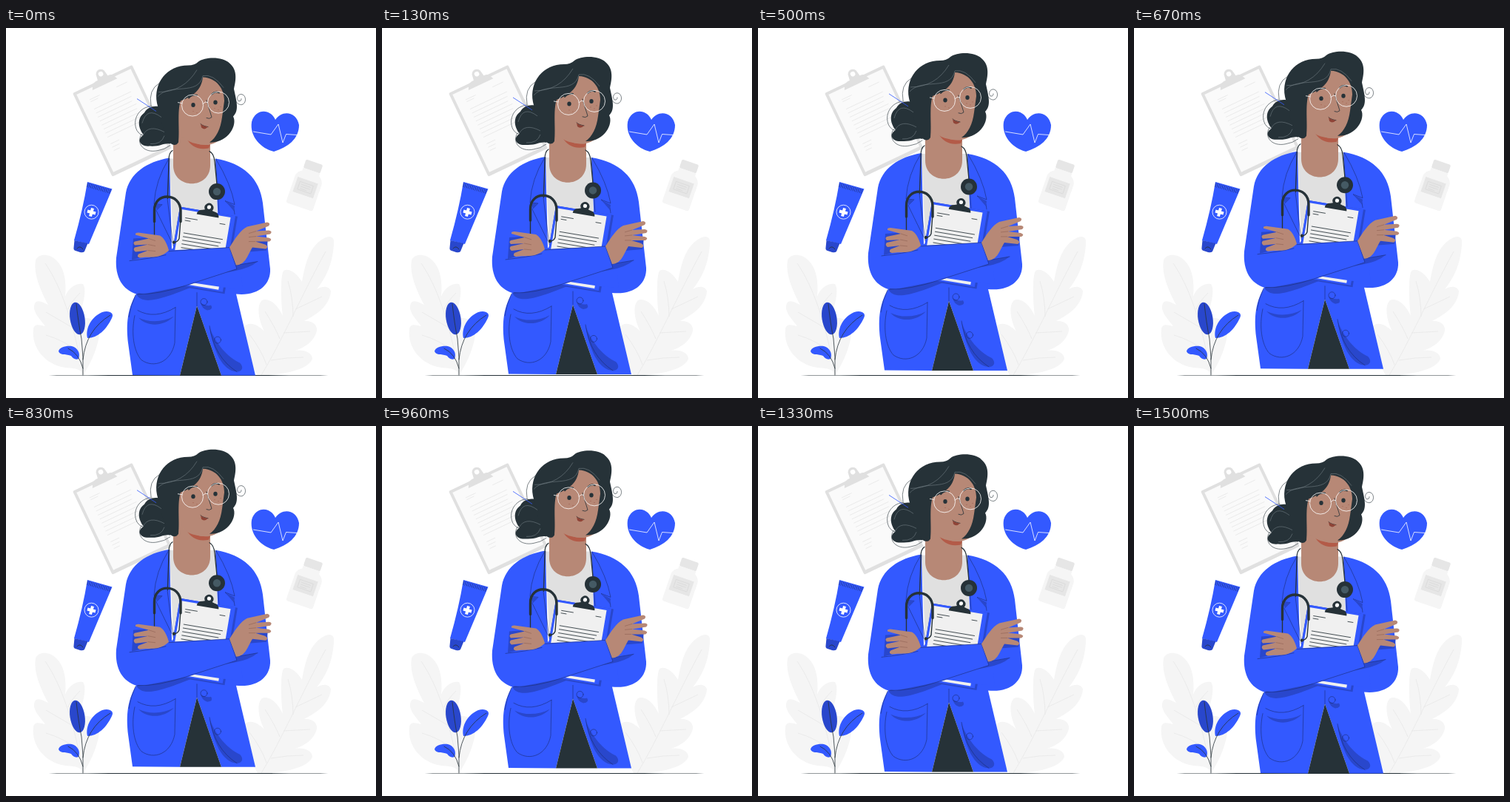
These frames come from a looping animation (500 by 500 pixels, 1540 ms). An HTML page:

```html
<!DOCTYPE html>
<html lang="en">
<head>
<meta charset="utf-8">
<title>Doctor</title>
<style>
  html, body { margin: 0; height: 100%; overflow: hidden; background: #fff; }
  svg { display: block; width: 100vw; height: 100vh; }
  .blue { fill: #3359ff; }
  .deep { fill: #2947cc; }
  .dark { fill: #263238; }
  .skin { fill: #b78876; }
  .pale { fill: #f5f5f5; }
  .mist { fill: #fafafa; }
  .grey { fill: #e0e0e0; }
  .soft { fill: #e6e6e6; }
  .line { fill: none; stroke: #263238; stroke-width: .8; stroke-linecap: round; stroke-linejoin: round; }
  .seam { fill: none; stroke: #1c2c73; stroke-width: .6; stroke-linecap: round; stroke-linejoin: round; }
  .vein { fill: none; stroke: #e6e6e6; stroke-width: .7; }
  .white { fill: none; stroke: #fff; stroke-width: .8; }
  .hair { fill: none; stroke: #7f8b91; stroke-width: .5; }
</style>
</head>
<body>
<svg viewBox="0 0 500 500">
  <!-- background foliage -->
  <path class="pale" d="M104 468C100 459 90 460 80 459C54 455 34 433 37 407C38 399 45 401 53 403C43 390 35 382 39 372C42 366 51 371 57 374C45 352 37 330 40 314C44 304 59 305 68 314C78 323 82 340 80 363C84 351 95 344 104 346C110 354 104 377 96 396C103 389 117 390 126 402C128 420 120 444 105 468Z"/>
  <path class="vein" d="M53 318C75 350 92 400 104 468M54 384L90 405M54 415Q78 422 97 437M100 358Q88 370 84 380"/>
  <path class="pale" d="M340 469C325 445 318 420 322 404C328 395 342 402 349 410C340 392 339 374 346 368C356 364 367 374 374 389C371 362 371 336 375 328C383 323 394 333 400 343C405 315 411 293 432 283C441 280 444 284 443 293C441 320 432 338 420 353C430 347 438 350 439 356C437 376 420 387 403 396C414 395 421 401 420 409C416 425 402 433 387 437C400 433 414 438 414 447C409 462 372 470 340 469Z"/>
  <path class="vein" d="M345 469C372 425 400 360 432 302M381 342Q388 365 388 390M350 383Q364 405 370 420M329 414Q345 435 352 455M427 363L391 380M411 410L375 412M402 445Q380 445 358 449"/>

  <!-- background clipboard -->
  <g transform="translate(90 88) rotate(-25.4)">
    <rect class="grey" width="89" height="125" rx="2"/>
    <rect class="mist" x="4" y="4" width="81" height="116"/>
    <path class="grey" d="M26 8L29 2Q31 -1 38 -1L39 -7A6.5 6.5 0 0 1 52 -7L53 -1Q59 -1 60 2L63 8Z"/>
    <circle cx="45.500" cy="-7" r="3.300" fill="#fff"/>
    <g id="notes" class="vein"></g>
  </g>

  <!-- tube -->
  <path class="blue" d="M110 208L143.500 217.500L112 292L92 287Q104 245 110 208Z"/>
  <path class="deep" d="M92.500 287L110.500 291L106 302Q104 304 100 303L94 301Q91 300 91.500 297Z"/>
  <path class="line" d="M96 298Q100 293 104 299"/>
  <path d="M110 212L141 221" fill="none" stroke="#1c2c73" stroke-width="6" stroke-dasharray=".6 1.800"/>
  <circle class="white" cx="115.500" cy="248.700" r="9.500"/>
  <path d="M117 243.500L114 254.500M110 247.500L121 250.500" stroke="#fff" stroke-width="4"/>

  <!-- heart -->
  <path class="blue" d="M364 124C358 109 337 108 332 127C329 147 345 163 362 167C381 161 396 150 396 131C393 113 373 110 364 124Z"/>
  <path class="white" d="M334 140L358 144L368 130L374 155L378.500 143.500L393 144.500"/>

  <!-- bottle -->
  <g transform="translate(415 187) rotate(19)">
    <rect class="soft" x="-12" y="-6" width="24" height="12" rx="2"/>
    <path class="pale" d="M-12 6H12V10Q19 14 19 21V55Q19 58 16 58H-16Q-19 58 -19 55V21Q-19 14 -12 10Z"/>
    <rect class="soft" x="-15" y="20" width="29" height="21"/>
    <path d="M-10 25H9V36H-10ZM-7 28H6M-7 31H6M-7 34H2" fill="none" stroke="#d8d8d8" stroke-width=".7"/>
  </g>

  <!-- plant -->
  <ellipse class="deep" cx="96.500" cy="392.500" rx="10" ry="22" transform="rotate(-9 96.500 392.500)"/>
  <path class="blue" d="M110 419C107 405 116 390 130 384C139 381 147 385 143 392C136 407 124 419 110 419Z"/>
  <path class="blue" d="M71 437C72 431 82 429 89 430C97 432 101 440 98 447C94 449 90 446 88 443C82 440 73 443 71 437Z"/>
  <path class="line" d="M95 373Q98 400 102 420Q105 445 104 469M141 388Q108 408 104 448M84 433Q99 440 104 460"/>
  <ellipse class="dark" cx="246.500" cy="469.500" rx="192.500" ry=".5"/>

  <g id="doctor">
    <!-- torso -->
    <path class="grey" d="M221 176L285 176L290 262L226 292Z"/>
    <path class="skin" d="M226 145L276 150V185C276 218 226 218 226 185Z"/>
    <path class="blue" d="M221 175C190 180 167 196 162 222L149 310C147 337 158 353 176 359C162 382 163 405 165 425L171 468.500L235 469L258 375L291 469L337 469L311 359C340 362 358 347 357 325L347 236C343 203 321 182 283 176L288 290L224 298Z"/>
    <path class="dark" d="M258 375L235 469H291Z"/>
    <path class="seam" d="M221 176L218 230L226 294M220 176Q202 205 200 237L211 238L203 246L224 289M283 177L288 250M284 177Q304 210 309 238L296 233L308 244L309 251"/>
    <path class="deep" d="M201 238L211 238L204 245ZM296 233L309 240L308 247Z"/>

    <!-- coat details -->
    <path class="deep" d="M176 359C184 374 207 368 257 347L220 345ZM179 391C190 403 212 404 227 389C212 397 194 398 179 391ZM263 371Q271 376 277 374Q281 380 272 381Q265 379 263 371ZM275 403C282 425 300 445 316 452C322 458 319 464 312 464C292 463 280 435 275 403Z"/>
    <path class="seam" d="M174 388C169 410 172 436 183 448C200 460 223 451 228 425L229 377M178 381Q201 394 229 377M258 357V375M275 402Q281 444 312 464M175 360Q168 375 166 390"/>
    <circle class="seam" cx="267.500" cy="369.500" r="4.500"/>
    <circle class="seam" cx="286" cy="421" r="4.500"/>

    <!-- front clipboard -->
    <g transform="translate(235 241) rotate(9.500)">
      <path class="deep" d="M0 0H79V106H0Z"/>
      <path class="blue" d="M0 0H76V104H0Z"/>
      <path fill="#f0f0f0" d="M3 3H70V102H3Z"/>
      <path class="dark" d="M24 6Q24 0 31 -1L34 -2A6 6 0 1 1 44 -2L47 -1Q54 0 54 6Z"/>
      <circle cx="39" cy="-6" r="2.600" fill="#fff"/>
      <g id="chart" class="line"></g>
    </g>

    <!-- stethoscope -->
    <path class="line" style="stroke-width:1.200" d="M225 165Q220 168 220 178L218.500 230M275 166Q281 169 282 180L285 211"/>
    <path class="line" style="stroke-width:1.400" d="M200.500 259V290M236 258L234 284Q232 289 227 289"/>
    <path class="line" style="stroke-width:3.400" d="M200.500 261V246C200 221 236 221 236 247V261"/>
    <circle class="dark" cx="227" cy="289" r="2.200"/>
    <circle class="dark" cx="285" cy="220.500" r="11"/>
    <circle cx="285" cy="220.500" r="5.200" fill="#455a64"/>

    <!-- arms -->
    <path class="blue" d="M316 318L254 344L294 350L320 352Z"/>
    <path class="deep" d="M297 330L312 320L340 315Q330 324 308 328ZM172 284L200 282V311L170 313ZM330 288L354 285L352 300L328 302Z"/>
    <path class="blue" d="M150 320L166 314L221 300L302 296L312 325L246 347L186 359Q155 357 150 320Z"/>
    <path class="seam" d="M167 314Q195 311 216 306M220 301L302 296L312 325L244 347Q205 360 178 359M311 320L340 315"/>
    <path class="skin" d="M220 300C217 289 213 283 208 280L179 276Q174 276 175 279L193 284L174 288Q171 290 174 293L192 292L174 296Q171 299 175 302L192 300L179 305Q176 309 181 310C195 308 208 312 220 300Z"/>
    <path class="skin" d="M302 296C309 285 317 272 326 268L353 262Q358 263 355 267L338 274L355 273Q361 274 357 278L338 281L355 283Q361 285 356 288L337 288L350 292Q356 295 351 298L333 296C326 307 324 319 311 320Z"/>
    <path fill="none" stroke="#8f6254" stroke-width=".6" d="M193 284L202 287M192 292L202 294M192 300L202 301M338 274L328 277M338 281L328 282M337 288L328 288"/>

    <!-- head -->
    <path class="dark" d="M222 156C213 154 209 160 194 159C181 160 176 150 186 144C178 134 177 121 187 114C191 106 202 103 210 107L233 115L226 150Z"/>
    <path fill="#b35b48" d="M244 149C253 155 264 159 276 157L274 162C259 165 250 159 244 149Z"/>
    <path class="skin" d="M232 98L266 64L288 64L299 88C299 113 297 138 289 150C280 159 268 158 258 156Q246 154 240 147L233 148Z"/>
    <path class="dark" d="M204 101C199 73 218 50 246 50Q255 50 260 45C270 38 293 38 302 47C314 57 310 72 308 82C312 100 315 111 307 119C313 130 301 155 275 154C284 148 290 136 292 120L295 98C295 82 285 67 266 66C264 84 252 92 236 98C231 112 235 137 233 154C229 161 220 157 217 146C210 131 208 116 204 101Z"/>
    <path class="hair" d="M205 92C222 73 260 92 266 64Q280 61 294 80M206 86Q240 86 258 56M210 120Q190 105 184 128M214 140Q193 129 185 144M195 156Q210 157 214 145"/>
    <path class="line" style="stroke-width:.6" d="M207 74Q192 83 196 104M197 105C179 106 170 124 177 138Q182 146 188 144M183 143C175 156 187 169 205 165Q214 164 222 158M307 80C306 97 313 104 319 103C325 101 325 91 319 89C313 88 311 95 314 98Q318 99 318 95"/>
    <path d="M177 95L203 112" stroke="#3359ff" stroke-width=".8"/>

    <!-- face -->
    <g class="dark">
      <ellipse cx="253" cy="103.500" rx="2.700" ry="3"/>
      <ellipse cx="283" cy="100" rx="2.700" ry="3"/>
    </g>
    <path class="line" style="stroke-width:1.800" d="M247 94Q251 89 258 90M278 89Q283 84 288 87"/>
    <path class="line" d="M271 97L278 120Q275 123 271 121M263 129Q266 132 273 133"/>
    <path fill="#8f4437" d="M263 129Q266 132 273 133Q268 138 264 134Z"/>
    <path fill="none" stroke="#a0604f" stroke-width="1.200" stroke-linecap="round" d="M253 112h0M258 114h0M282 108h0M287 110h0M290 106h0"/>
    <g class="white">
      <circle cx="252" cy="104" r="14.500"/>
      <circle cx="287" cy="100" r="14.500"/>
      <path d="M266 102Q269 98 273 100M238 101L232 100"/>
    </g>
  </g>
</svg>
<script>
  const byId = id => document.getElementById(id);
  const addLines = (id, rows) => {
    const d = rows.map(([x1, x2, y]) => `M${x1} ${y}H${x2}`).join('');
    byId(id).innerHTML = `<path d="${d}"/>`;
  };
  const paragraph = (count, x1, x2, y, gap) =>
    Array.from({ length: count }, (_, i) => [x1, x2 - (i % 3) * 2, y + i * gap]);

  addLines('notes', [[17, 32, 18], [17, 28, 21], [57, 73, 18],
    ...paragraph(8, 17, 72, 32, 6), ...paragraph(3, 17, 30, 84, 5)]);
  addLines('chart', [[10, 26, 13.5], [10, 17, 17], [57, 64, 13.5],
    ...paragraph(6, 11, 64, 34, 5)]);

  const LOOP = 1540, CYCLE = 1500, FPS = 24, LIFT = 10, REST = .6;
  const doctor = byId('doctor');
  const start = performance.now();

  function draw(now) {
    const t = Math.max(0, now - start) % LOOP;
    const step = Math.floor((t + 9) * FPS / 1000) * 1000 / FPS;
    const phase = Math.min(step, CYCLE) / CYCLE;
    const y = REST - LIFT * (1 - Math.abs(2 * phase - 1));
    doctor.setAttribute('transform', `translate(0 ${y.toFixed(3)})`);
    requestAnimationFrame(draw);
  }
  draw(start);
</script>
</body>
</html>
```
